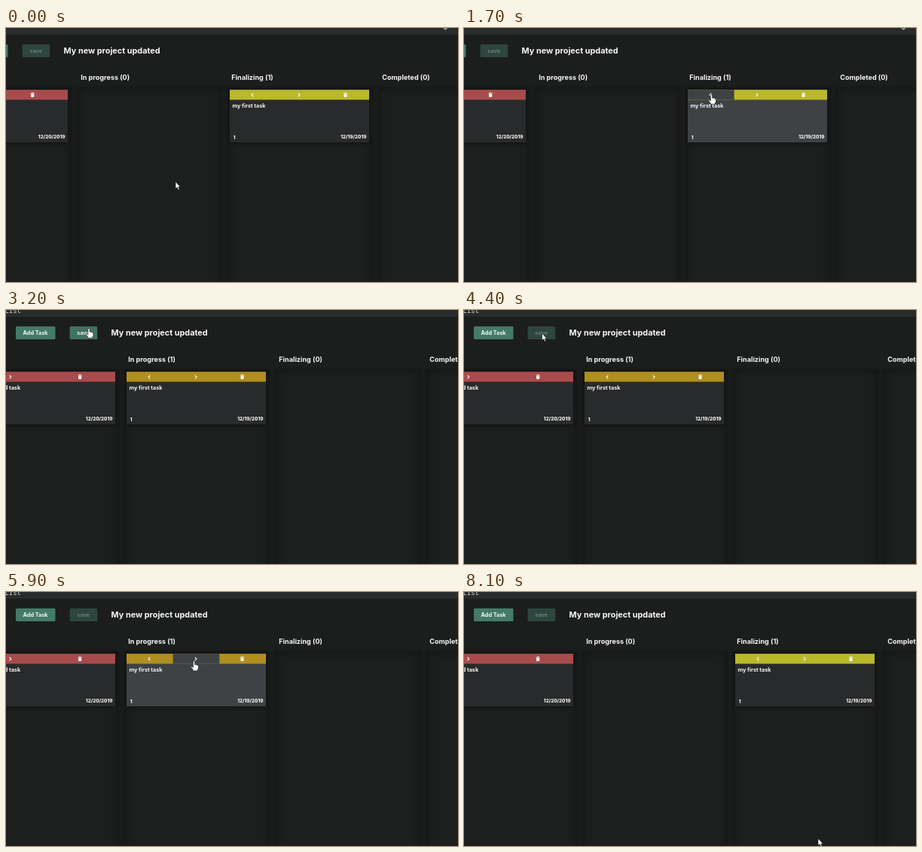
Write an HTML page that moves like this. It is 600 by 338 pixels and loops after 8400 ms.

```html
<!DOCTYPE html>
<html lang="en">
<head>
<meta charset="utf-8">
<title>Task board</title>
<style>
  html, body { margin: 0; width: 100%; height: 100%; overflow: hidden; background: #1c1d1d; }
  #stage { position: relative; width: 600px; height: 338px; overflow: hidden; background: #1c1d1d; }
  #bar { position: absolute; left: 0; top: 0; width: 600px; height: 9px; background: #2a2b2c; }
  #board { position: absolute; left: 0; top: 0; width: 600px; height: 338px; }
  .col { position: absolute; top: 79px; width: 193px; height: 280px; background: #1d1e1e;
         box-shadow: inset 0 0 12px rgba(0,0,0,.42), 0 0 4px rgba(0,0,0,.25); }
  svg { position: absolute; left: 0; top: 0; overflow: visible; }
  text { font-family: Inter, "Open Sans", sans-serif; font-weight: 700; font-size: 7.25px; fill: #f6f6f6; }
  .name { font-size: 10.85px; }
  .head { font-size: 9.05px; }
  .date { font-size: 6.3px; font-weight: 800; }
  .mono { font: 9px "Noto Sans Mono", monospace; fill: #dcdcdc; }
  .card { filter: drop-shadow(0 1px 2px rgba(0,0,0,.5)); }
  .line { fill: none; stroke: #f4f4f4; stroke-width: 1.2; }
</style>
</head>
<body>
<div id="stage">
  <div id="bar"></div>
  <div id="board"><svg id="art" width="600" height="338"></svg></div>
  <svg width="600" height="338">
    <g id="pointer" stroke="#17181a" stroke-width=".7" stroke-linejoin="round" fill="#fff">
      <path id="arrow" d="M0 0V9.6L2.2 7.6 3.7 11 5.3 10.3 3.8 7H6.6Z"/>
      <path id="hand" d="M-1.2 1.1Q0-.7 1.2 1.1V5L2.6 5 3.2 5.5 4.4 5.5 5 6.2Q6 6.1 6 7.2V9.6Q5.7 11.2 4.8 12V13.4H-1.2V12.2L-4 8.6Q-4.3 7.3-3 7.5L-1.2 9Z"/>
    </g>
  </svg>
</div>
<script>
const LOOP = 8400, STEP = 100;
const MOVE_BACK = 1900, SAVE_ONE = 4000, MOVE_ON = 6200, SAVE_TWO = 6850;
const PAN = 63, PAN_START = 2750, PAN_TIME = 400;
const PERIOD = 200, CARD_X = 97, CARD_W = 185, CARD_Y = 82.2, CARD_H = 70, HEADER_H = 13.3;
const AMBER = "#b08e20", YELLOW = "#b9b92a", RED = "#a84b4c";
const BODY = [41, 42, 43], BODY_HOVER = [63, 66, 68];
const SAVE_OFF = [46, 70, 64], SAVE_ON = [64, 114, 99];
const LABEL_OFF = [108, 124, 118], LABEL_ON = [240, 242, 241];
const NS = "http://www.w3.org/2000/svg";

// pointer moves: start, length, where to
const home = { x: 225, y: 204.5 };
const moves = [
  { at: 0, len: 900, x: 319, y: 96.5 },
  { at: 900, len: 350, x: 328.5, y: 88 },
  { at: 2300, len: 600, x: 110, y: 24 },
  { at: 3700, len: 400, x: 103.5, y: 31 },
  { at: 4600, len: 750, x: 249.5, y: 91.5 },
  { at: 6250, len: 450, x: 104, y: 30 },
  { at: 7500, len: 600, x: 470, y: 328 }
];

const $ = id => document.getElementById(id);
const board = $("board"), art = $("art");
const lerp = (a, b, k) => a + (b - a) * k;
const mix = (a, b, k) => `rgb(${a.map((v, i) => Math.round(lerp(v, b[i], k)))})`;

function ramp(t, at, len) {
  const k = Math.min(1, Math.max(0, (t - at) / len));
  return k * k * (3 - 2 * k);
}
const pulse = (t, from, to) => ramp(t, from, 250) - ramp(t, to, 250);

const pointAt = t => moves.reduce((p, m) => {
  const k = ramp(t, m.at, m.len);
  return { x: lerp(p.x, m.x, k), y: lerp(p.y, m.y, k) };
}, home);

const inside = (p, x, y, w, h) => p.x >= x && p.x <= x + w && p.y >= y && p.y <= y + h;

// share of the last 200 ms the pointer spent in a box
function hoverAt(t, ...area) {
  let n = 0;
  for (let i = 0; i < 8; i++) n += inside(pointAt(t - i * 25), ...area);
  return n / 8;
}

function add(parent, tag, attrs, content) {
  const el = document.createElementNS(NS, tag);
  for (const key in attrs) el.setAttribute(key, attrs[key]);
  if (content) el.textContent = content;
  return parent.appendChild(el);
}
const box = (parent, x, y, width, height, fill, rx = 0) =>
  add(parent, "rect", { x, y, width, height, fill, rx });
const label = (parent, x, y, content, cls = "", anchor = "start") =>
  add(parent, "text", { x, y, class: cls, "text-anchor": anchor }, content);

const icons = {
  left: { class: "line", d: "M1.1-2.3L-1.1 0 1.1 2.3" },
  right: { class: "line", d: "M-1.1-2.3L1.1 0-1.1 2.3" },
  bin: { fill: "#f4f4f4", d: "M-2.7-2.7H-.9V-3.3H.9V-2.7H2.7V-1.8H-2.7ZM-2.3-1.4H2.3L1.9 3H-1.9Z" }
};

function makeCard(x, color, names, title, number, date) {
  const g = add(art, "g", { class: "card", transform: `translate(${x} 0)` });
  const w = CARD_W / names.length;
  const body = box(g, 0, CARD_Y, CARD_W, CARD_H, mix(BODY, BODY, 0));
  const header = box(g, 0, CARD_Y, CARD_W, HEADER_H, color);
  const lit = box(g, 0, CARD_Y, w, HEADER_H, mix(BODY_HOVER, BODY_HOVER, 0));
  lit.style.opacity = 0;
  names.forEach((name, i) =>
    add(g, "path", { ...icons[name], transform: `translate(${(i + .5) * w - .6} 89.1)` }));
  label(g, 3.5, 106.3, title);
  label(g, 4.8, 148, number, "date");
  label(g, 181.4, 146.8, date, "date", "end");
  return { g, body, header, lit, w };
}

for (let i = -1; i < 3; i++) {
  const col = document.createElement("div");
  col.className = "col";
  col.style.left = 94 + i * PERIOD + "px";
  board.insertBefore(col, art);
}

label(art, -43, 4, "List", "mono", "end");
add(art, "path", { class: "line", opacity: .7, d: "M580.8-.3L583.3 2 585.8-.3" });
box(art, -50, 21.8, 52.5, 17.2, "#447a69", 1.5);
label(art, -24, 33.1, "Add Task", "", "middle");
const save = box(art, 21.6, 21.8, 36.6, 17.2, "#2e4640", 1.5);
const saveText = label(art, 39.7, 33.1, "save", "", "middle");
label(art, 76.6, 34.4, "My new project updated", "name");
const heads = ["In progress", "Finalizing", "Completed"].map((name, i) =>
  ({ name, el: label(art, 99.3 + i * PERIOD, 69, "", "head") }));
makeCard(CARD_X - PERIOD, RED, ["right", "bin"], "my second task", "2", "12/20/2019");
const task = makeCard(CARD_X, YELLOW, ["left", "right", "bin"], "my first task", "1", "12/19/2019");

function draw(t) {
  const column = t >= MOVE_BACK && t < MOVE_ON ? 0 : 1;
  const pan = PAN * ramp(t, PAN_START, PAN_TIME);
  const x = CARD_X + column * PERIOD;
  const active = (1 - column) * task.w;
  const hover = hoverAt(t, x + pan, CARD_Y, CARD_W, CARD_H);

  board.style.transform = `translateX(${pan}px)`;
  task.g.setAttribute("transform", `translate(${x} 0)`);
  task.body.setAttribute("fill", mix(BODY, BODY_HOVER, hover));
  task.header.setAttribute("fill", column ? YELLOW : AMBER);
  task.lit.setAttribute("x", active);
  task.lit.style.opacity = hoverAt(t, x + pan + active, CARD_Y, task.w, HEADER_H);
  heads.forEach(({ name, el }, i) => { el.textContent = `${name} (${+(i === column)})`; });

  const on = pulse(t, MOVE_BACK, SAVE_ONE) + pulse(t, MOVE_ON, SAVE_TWO);
  save.setAttribute("fill", mix(SAVE_OFF, SAVE_ON, on));
  saveText.style.fill = mix(LABEL_OFF, LABEL_ON, on);

  const p = pointAt(t);
  const isHand = hover > 0 || (on > .5 && inside(p, 21.6 + pan, 21.8, 36.6, 17.2));
  $("pointer").setAttribute("transform", `translate(${p.x} ${p.y})`);
  $("hand").style.display = isHand ? "" : "none";
  $("arrow").style.display = isHand ? "none" : "";
}

const start = performance.now();
function tick() {
  const t = (performance.now() - start) % LOOP;
  draw(Math.floor(t / STEP) * STEP);
  requestAnimationFrame(tick);
}
tick();
</script>
</body>
</html>
```
